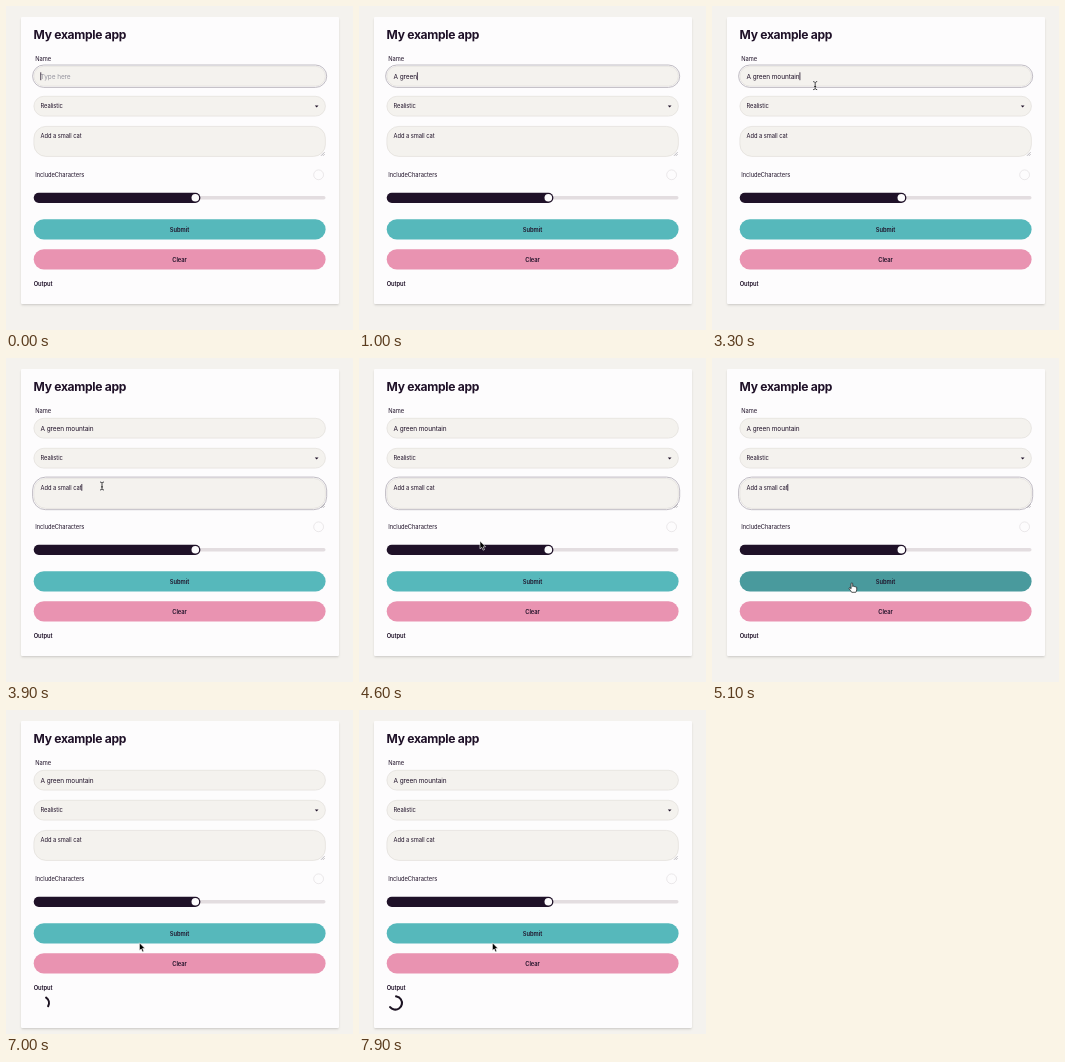
Write an HTML page that moves like this. It is 347 px wide and 324 px high and loops after 8000 ms.

```html
<!DOCTYPE html>
<html lang="en">
<head>
<meta charset="utf-8">
<title>My example app</title>
<style>
  html, body { margin: 0; width: 100%; height: 100%; overflow: hidden; background: #f4f2ee; }
  #card {
    position: absolute; left: 14.5px; top: 11px; width: 318.3px; height: 287px;
    background: #fdfcfd; border-radius: 1px;
    box-shadow: 0 1.7px 2.5px -.4px rgba(0,0,0,.13), 0 .8px 1.7px -.8px rgba(0,0,0,.13);
  }
  svg { position: absolute; left: 0; top: 0; display: block; }
  text { font: 400 5.75px Inter, "Liberation Sans", sans-serif; letter-spacing: -.04px; fill: #1f1128; white-space: pre; }
  .title { font-size: 12.1px; font-weight: 700; letter-spacing: -.3px; }
  .bold { font-weight: 600; }
  .mid { text-anchor: middle; }
  .big { font-size: 6.5px; letter-spacing: -.08px; }
  .hint { fill: #96959f; }
  .field { fill: #f4f2ee; stroke: #dedbd6; stroke-width: .6; }
  .ring { fill: none; stroke: #b9b5bd; stroke-width: .9; }
  .caret { fill: #1f1128; }
  .pointer { visibility: hidden; stroke-linejoin: round; }
</style>
</head>
<body>
<div id="card"></div>
<svg width="347" height="324" viewBox="0 0 347 324">
  <text class="title" x="27.6" y="32.6">My example app</text>

  <text x="29.2" y="55.1">Name</text>
  <rect class="field" x="27.9" y="60.3" width="291.5" height="19.8" rx="9.9"/>
  <rect class="ring" id="nameRing" x="26.6" y="59" width="294.1" height="22.4" rx="11.2"/>
  <text class="big hint" id="hint" x="34.5" y="72.8">Type here</text>
  <text class="big" id="name" x="34.5" y="72.8"></text>
  <rect class="caret" id="nameCaret" y="66.3" width=".8" height="7.9"/>

  <rect class="field" x="27.9" y="90.3" width="291.5" height="19.8" rx="9.9"/>
  <text x="34.5" y="102.2">Realistic</text>
  <path d="M308.8 99.5h3.7l-1.85 2z" fill="#1f1128"/>

  <rect class="field" x="27.9" y="120.4" width="291.5" height="30" rx="12"/>
  <rect class="ring" id="noteRing" x="26.6" y="119.1" width="294.1" height="32.6" rx="13"/>
  <path d="M315 149.8l3.6-3.6M317 149.8l1.6-1.6" stroke="#77727a" stroke-width=".5"/>
  <text id="note" x="34.5" y="131.5">Add a small cat</text>
  <rect class="caret" id="noteCaret" y="126" width=".8" height="6.8"/>

  <text x="29.2" y="171.1">IncludeCharacters</text>
  <circle cx="312.6" cy="168.8" r="4.9" fill="#fdfcfd" stroke="#dedbdc" stroke-width=".6"/>

  <rect x="27.9" y="190.1" width="291.6" height="3.4" rx="1.7" fill="#e3dde0"/>
  <rect x="27.7" y="186.7" width="166.7" height="10.2" rx="5.1" fill="#1f1128"/>
  <circle cx="189.3" cy="191.8" r="3.8" fill="#fdfcfd"/>

  <rect id="submit" x="27.7" y="213.3" width="291.9" height="20.2" rx="10.1"/>
  <text class="bold mid" x="173.5" y="225.6">Submit</text>
  <rect x="27.7" y="243.3" width="291.9" height="20.2" rx="10.1" fill="#e993b1"/>
  <text class="bold mid" x="173.5" y="255.6">Clear</text>

  <text class="bold" x="27.7" y="279.6">Output</text>
  <circle id="spinner" r="9.5" fill="none" stroke="#1c1322" stroke-width="3" stroke-linecap="round"/>

  <g class="pointer" id="beam" fill="none">
    <path d="M-2-4q1.6 0 2 1q.4-1 2-1M0-3V3M-2 4q1.6 0 2-1q.4 1 2 1M-1 .9H1" stroke="#fff" stroke-width="1.5"/>
    <path d="M-2-4q1.6 0 2 1q.4-1 2-1M0-3V3M-2 4q1.6 0 2-1q.4 1 2 1M-1 .9H1" stroke="#111" stroke-width=".8"/>
  </g>
  <path class="pointer" id="arrow" d="M0 0V7.8L1.8 6.2L3.1 9.1L4.5 8.5L3.2 5.7H5.6Z" fill="#000" stroke="#fff" stroke-width=".6"/>
  <path class="pointer" id="hand" fill="#fff" stroke="#111" stroke-width=".7"
    d="M-.9 5.3V.8a.8.8 0 0 1 1.6 0V3.5q.8-.7 1.5.1q.9-.5 1.4.3q1-.2 1.1.8V6.5q0 1.5-.9 2.8H-.3q-1-1.8-2.5-3.4q-.4-.9.3-1.1q.8 0 1.6 1z"/>
</svg>
<script>
  const LOOP = 8000, STEP = 100;
  const el = id => document.getElementById(id);
  const PHRASE = 'A green mountain';
  // moment of each key press, in steps
  const KEYS = [1, 2, 4, 5, 8, 9, 10, 11, 12, 14, 15, 16, 17, 18, 20, 21];
  const TYPED = 2100, FOCUS_NOTE = 3900, CLICK = 5300, LEAVE = 6100;

  // time, x, y of the pointer's hot spot
  const PATH = [
    [3200, 104, 74], [3700, 96, 128], [4000, 96, 128],
    [5100, 140, 225], [5200, 140, 225], [6000, 135, 230.5], [6200, 133.4, 232.8]
  ];

  const clamp = v => Math.max(0, Math.min(1, v));
  const ease = v => { v = clamp(v); return v * v * (3 - 2 * v); };
  const show = (node, on) => { node.style.visibility = on ? 'visible' : 'hidden'; };
  const blink = (t, from) => Math.floor((t - from) / 500) % 2 === 0;

  function pointerAt(t) {
    let i = 0;
    while (i < PATH.length - 2 && t >= PATH[i + 1][0]) i++;
    const [t0, x0, y0] = PATH[i], [t1, x1, y1] = PATH[i + 1];
    const k = ease((t - t0) / (t1 - t0));
    return [x0 + (x1 - x0) * k, y0 + (y1 - y0) * k];
  }

  function pointerKind(t, y) {
    if (t < 3300) return '';
    if (t >= LEAVE) return 'arrow';
    if (y >= 213 || (y > 186 && y < 198)) return 'hand';
    if (y < 81 || (y > 120 && y < 151)) return 'beam';
    return 'arrow';
  }

  function drawPointer(t) {
    const [x, y] = pointerAt(t), kind = pointerKind(t, y);
    for (const id of ['beam', 'arrow', 'hand']) {
      show(el(id), id === kind);
      el(id).setAttribute('transform', `translate(${x} ${y})`);
    }
  }

  function placeCaret(caret, text, on) {
    const width = text.textContent ? text.getComputedTextLength() : 0;
    caret.setAttribute('x', 34.4 + width);
    show(caret, on);
  }

  function drawFields(t) {
    const count = KEYS.filter(k => k * STEP <= t).length;
    el('name').textContent = PHRASE.slice(0, count);
    show(el('hint'), count === 0);

    const onName = t < FOCUS_NOTE, onNote = !onName && t < CLICK;
    show(el('nameRing'), onName);
    show(el('noteRing'), onNote);
    placeCaret(el('nameCaret'), el('name'), onName && (t < TYPED || blink(t, TYPED)));
    placeCaret(el('noteCaret'), el('note'), onNote && blink(t, FOCUS_NOTE));
  }

  function drawSubmit(t) {
    const k = clamp((t - 4700) / 200) - clamp((t - LEAVE + STEP) / 200);
    const rgb = [[86, 184, 187], [73, 154, 157]];
    el('submit').style.fill = `rgb(${rgb[0].map((c, i) => Math.round(c + (rgb[1][i] - c) * k))})`;
  }

  // Arc grows, then its tail catches up, while the whole ring turns every 2 s
  function drawSpinner(t) {
    const s = el('spinner'), age = 3.16 + (t - 6000) / 1000;
    const p = (age % 1.5) / 1.5 / 0.475;
    const grow = ease(p), chase = ease(p - 1);
    show(s, t > CLICK);
    s.setAttribute('stroke-dasharray', `${42 * grow} 150`);
    s.setAttribute('stroke-dashoffset', -16 * grow - 43 * chase);
    s.setAttribute('transform', `translate(36.3 293) scale(.7) rotate(${age * 180})`);
  }

  const start = performance.now();
  function draw() {
    const t = Math.floor(((performance.now() - start) % LOOP) / STEP) * STEP;
    el('card').style.height = (t > CLICK ? 306.5 : 287) + 'px';
    drawFields(t);
    drawSubmit(t);
    drawSpinner(t);
    drawPointer(t);
    requestAnimationFrame(draw);
  }
  draw();
</script>
</body>
</html>
```
